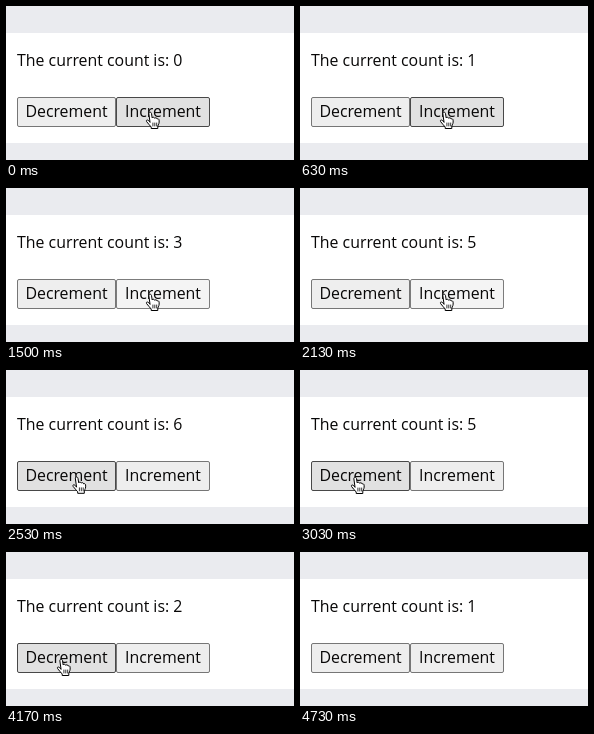
Write an HTML page that moves like this. It is 288 by 154 pixels and loops after 5460 ms.

```html
<!DOCTYPE html>
<html lang="en">
<head>
<meta charset="utf-8">
<title>Counter</title>
<style>
  html, body { margin: 0; width: 100%; height: 100%; overflow: hidden; background: #eaebef; }
  svg { display: block; width: 288px; height: 154px; }
  text { font: 500 15.9px "Open Sans", "Noto Sans", sans-serif; fill: #080707; }
  .button text { text-anchor: middle; }
  .button rect { fill: #eeeeee; stroke: #767676; }
  .button.hover rect { fill: #e1e1e1; stroke: #484848; }
  .button.active rect { fill: #f4f4f4; stroke: #7c7c7c; }
  #hand, #arrow { fill: #fff; stroke: #000; stroke-linejoin: round; stroke-linecap: round; }
</style>
</head>
<body>
<svg viewBox="0 0 288 154">
  <rect y="27" width="288" height="110" fill="#fff"/>
  <text x="11" y="60">The current count is: <tspan id="count">0</tspan></text>
  <g class="button" id="dec">
    <rect x="11.5" y="91.5" width="98" height="29" rx="1.5"/>
    <text x="60.5" y="111">Decrement</text>
  </g>
  <g class="button" id="inc">
    <rect x="110.5" y="91.5" width="93" height="29" rx="1.5"/>
    <text x="157" y="111">Increment</text>
  </g>
  <g id="cursor">
    <g id="hand">
      <path d="M5 11L3.9 3C3.6 .8 6.1 .5 6.5 2.6L7.2 7C7.6 5.9 9.4 6 9.7 7.3C10.4 6.4 11.9 6.7 12.1 8C13 7.5 14 8 14.1 9.2C14.5 12 13.5 13.5 12.8 15V17.5H6.2V16C4.6 14.4 3.2 12.3 1.6 10.6C.8 9.3 2.2 8.4 3.3 9.3Z"/>
      <path d="M7.9 12v3M9.8 12v3M11.7 12v3" stroke-width=".8"/>
    </g>
    <path id="arrow" d="M5 1v13l3-2.8 2 4.6 2-.9-2-4.4h4Z"/>
  </g>
</svg>
<script>
const LOOP = 5460;
const HOLD = 100;

// A run of clicks; `slow` stretches the gap a little with each click.
const runs = [
  { start: 500, gap: 326, slow: 0, clicks: 6, change: 1 },
  { start: 2930, gap: 310, slow: 18, clicks: 5, change: -1 }
];

const $ = id => document.getElementById(id);
const [count, dec, inc, cursor, hand, arrow] =
  ["count", "dec", "inc", "cursor", "hand", "arrow"].map($);
const show = (el, on) => el.setAttribute("visibility", on ? "visible" : "hidden");

// Eased progress from 0 to 1 between two times.
function glide(t, start, end) {
  const p = Math.min(1, Math.max(0, (t - start) / (end - start)));
  return p * p * (3 - 2 * p);
}

function counterAt(t) {
  let value = 0, pressed = false;
  for (const { start, gap, slow, clicks, change } of runs) {
    for (let i = 0; i < clicks; i++) {
      const since = t - (start + gap * i + slow * i * i);
      if (since >= HOLD) value += change;
      else if (since >= 0) pressed = true;
    }
  }
  return { value, pressed };
}

function draw(t) {
  const x = 139 - 89 * glide(t, 2340, 2600);
  const y = 105 + glide(t, 2340, 2600) + 52 * glide(t, 4640, 4730);
  const over = y > 119 ? null : x + 5 < 110 ? dec : inc;
  const { value, pressed } = counterAt(t);

  for (const b of [dec, inc]) {
    b.setAttribute("class", "button" + (b !== over ? "" : pressed ? " active" : " hover"));
  }
  count.textContent = value;
  cursor.setAttribute("transform", `translate(${x.toFixed(1)} ${y.toFixed(1)})`);
  show(hand, over);
  show(arrow, !over && y < 154);
}

function tick() {
  draw(performance.now() % LOOP);
  requestAnimationFrame(tick);
}
tick();
</script>
</body>
</html>
```
